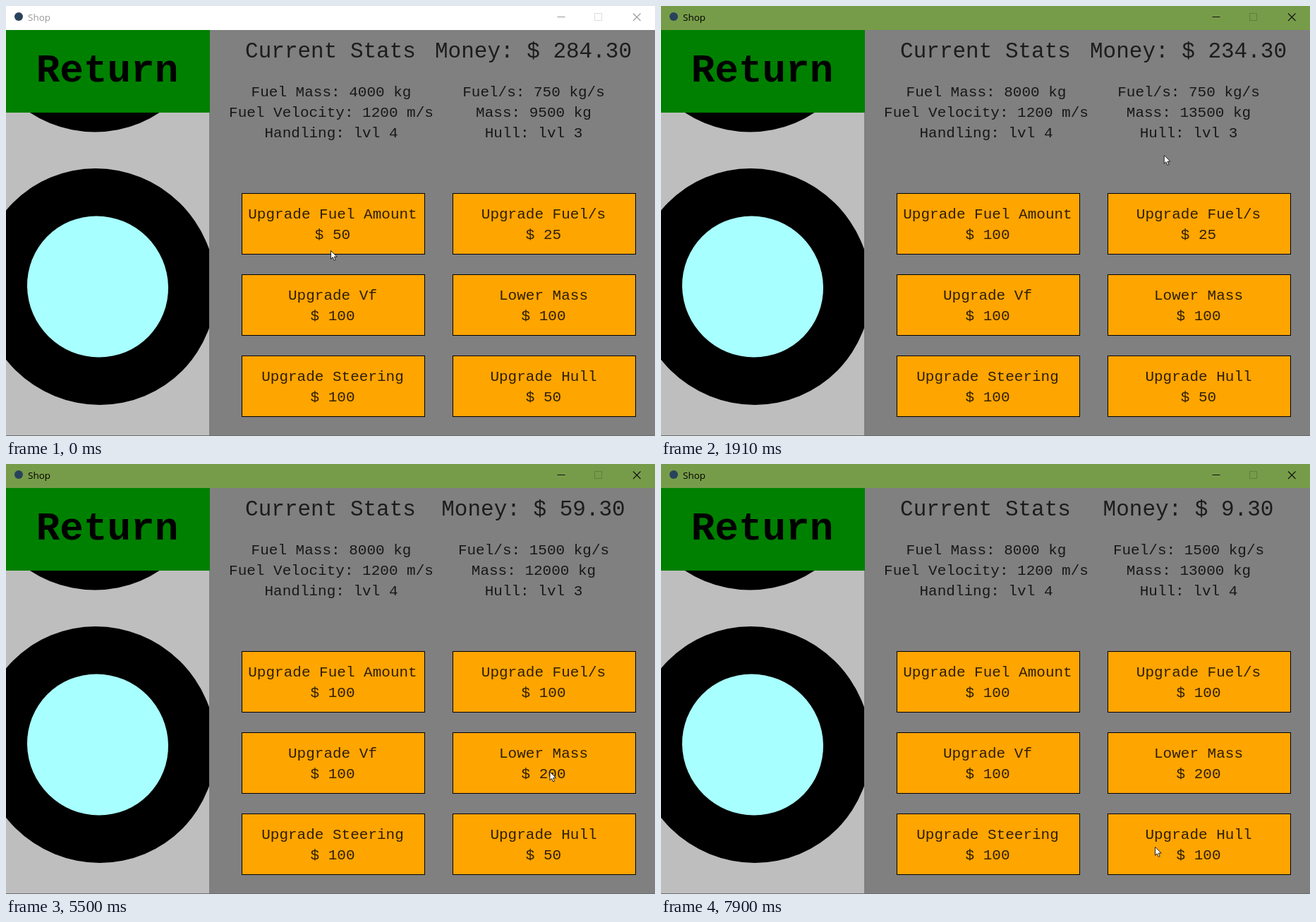
These frames come from a looping animation (920 by 609 pixels, 8 s). An HTML page:

```html
<!DOCTYPE html>
<html lang="en">
<head>
<meta charset="utf-8">
<title>Shop</title>
<style>
  html, body { margin: 0; width: 920px; height: 609px; overflow: hidden; background: #808080; }
  svg { display: block; }
  .mono { font-family: "Liberation Mono", "Courier New", monospace; text-anchor: middle; white-space: pre; }
  .head { font-size: 31px; fill-opacity: .78; }
  .body { font-size: 21px; fill-opacity: .82; }
  .return { font-size: 56px; font-weight: bold; }
  .title { font: 13.5px "Open Sans", "Noto Sans", sans-serif; }
  .button { fill: #ffa500; stroke: #000; }
</style>
</head>
<body>
<svg width="920" height="609" viewBox="0 0 920 609">
  <rect width="920" height="609" fill="#808080"/>
  <rect id="bar" width="920" height="34"/>
  <circle cx="18" cy="15" r="6" fill="#29425c"/>
  <text id="caption" class="title" x="31" y="21">Shop</text>
  <g id="controls" fill="none" stroke-width="1.1">
    <path d="M781.500 15.500H792.500M889 10.500L899.500 21M899.500 10.500L889 21"/>
    <rect id="maximize" x="834.500" y="10.500" width="10" height="10"/>
  </g>
  <svg y="150" width="288" height="459" viewBox="0 150 288 459">
    <rect y="150" width="288" height="459" fill="#bebebe"/>
    <g transform="translate(130 397.500) skewX(1)">
      <circle cy="-386.500" r="167.500"/>
      <circle r="167.500"/>
      <circle r="100" fill="#a8ffff"/>
    </g>
  </svg>
  <rect y="34" width="289" height="117" fill="#008000"/>
  <text class="mono return" x="143.500" y="107">Return</text>
  <path d="M0 608.500H920" stroke="#6c6c6c"/>
  <g id="shop"></g>
  <path id="cursor" d="M.5 .5V12.300L3.200 9.800L5.200 14.400L7.200 13.500L5.200 9.100H9.200Z"
        fill="#fff" stroke="#111" stroke-width=".9"/>
</svg>
<script>
const LOOP = 8000;
const $ = id => document.getElementById(id);

function add(tag, attrs) {
  const el = document.createElementNS("http://www.w3.org/2000/svg", tag);
  for (const key in attrs) el.setAttribute(key, attrs[key]);
  $("shop").append(el);
  return el;
}

// Labels whose text is computed from the shop state.
const labels = [];
function label(x, y, text, size = "body") {
  labels.push({ el: add("text", { class: "mono " + size, x, y }), text });
}

label(460, 73, () => "Current Stats", "head");
label(747.5, 73, s => `Money: $ ${s.money.toFixed(2)}`, "head");

const stats = [
  s => `Fuel Mass: ${s.fuel} kg`, s => `Fuel/s: ${s.flow} kg/s`,
  () => "Fuel Velocity: 1200 m/s", s => `Mass: ${s.mass} kg`,
  () => "Handling: lvl 4", s => `Hull: lvl ${s.hull}`
];
stats.forEach((text, i) => label(461 + i % 2 * 287, 127.5 + (i >> 1) * 29, text));

// Each upgrade: name, first price, effect on the state
const upgrades = [
  ["Upgrade Fuel Amount", 50, s => { s.fuel += 4000; s.mass += 4000; }],
  ["Upgrade Fuel/s", 25, (s, price) => { s.flow += price * 10; }],
  ["Upgrade Vf", 100],
  ["Lower Mass", 100, s => { s.mass -= 1500; }],
  ["Upgrade Steering", 100],
  ["Upgrade Hull", 50, s => { s.hull++; s.mass += 1000; }]
];
upgrades.forEach(([name], i) => {
  const x = 334.5 + i % 2 * 299, y = 265.5 + (i >> 1) * 115;
  add("rect", { class: "button", x, y, width: 259, height: 86 });
  label(x + 128.5, y + 35, () => name);
  label(x + 128.5, y + 64, s => `$ ${s.prices[i]}`);
});

// Time of each click and the upgrade it buys; a price doubles once paid.
const clicks = [[500, 0], [2280, 1], [3230, 1], [4800, 3], [7300, 5]];

function stateAt(t) {
  const s = { money: 284.3, fuel: 4000, flow: 750, mass: 9500, hull: 3,
              prices: upgrades.map(u => u[1]) };
  for (const [at, i] of clicks) {
    if (at > t) break;
    s.money -= s.prices[i];
    upgrades[i][2](s, s.prices[i]);
    s.prices[i] *= 2;
  }
  return s;
}

// Pointer moves: start, end, x, y, sideways bend
const home = [460, 346];
const moves = [
  [30, 800, 497, 307],
  [1140, 1270, 664, 315],
  [1550, 1690, 588, 262],
  [1690, 2340, 786, 298, 74],
  [2860, 3280, 777, 334, 55],
  [4350, 4850, 772, 435],
  [5500, 5810, 530, 528],
  [5810, 6080, 610, 549],
  [6380, 6730, 717, 536, 20],
  [6880, 6960, 717, 544],
  [7210, 7900, 700, 542]
];

function pointerAt(t) {
  let [x, y] = home;
  for (const [start, end, toX, toY, bend = 0] of moves) {
    if (t < start) break;
    const k = Math.min(1, (t - start) / (end - start));
    const eased = 1 - (1 - k) ** 2;
    const dx = toX - x, dy = toY - y;
    const side = bend * Math.sin(Math.PI * eased) / Math.hypot(dx, dy);
    x += dx * eased + dy * side;
    y += dy * eased - dx * side;
  }
  return [x, y];
}

function draw(t) {
  const state = stateAt(t);
  for (const { el, text } of labels) {
    const value = text(state);
    if (el.textContent !== value) el.textContent = value;
  }
  const active = t >= clicks[0][0];
  $("bar").style.fill = active ? "#779c49" : "#fff";
  $("caption").style.fill = active ? "#000" : "#999";
  $("controls").style.stroke = active ? "#111" : "#999";
  $("maximize").style.stroke = active ? "#62803c" : "#ddd";
  $("cursor").setAttribute("transform", `translate(${pointerAt(t)})`);
}

const start = performance.now();
function tick() {
  draw((performance.now() - start) % LOOP);
  requestAnimationFrame(tick);
}
tick();
</script>
</body>
</html>
```
